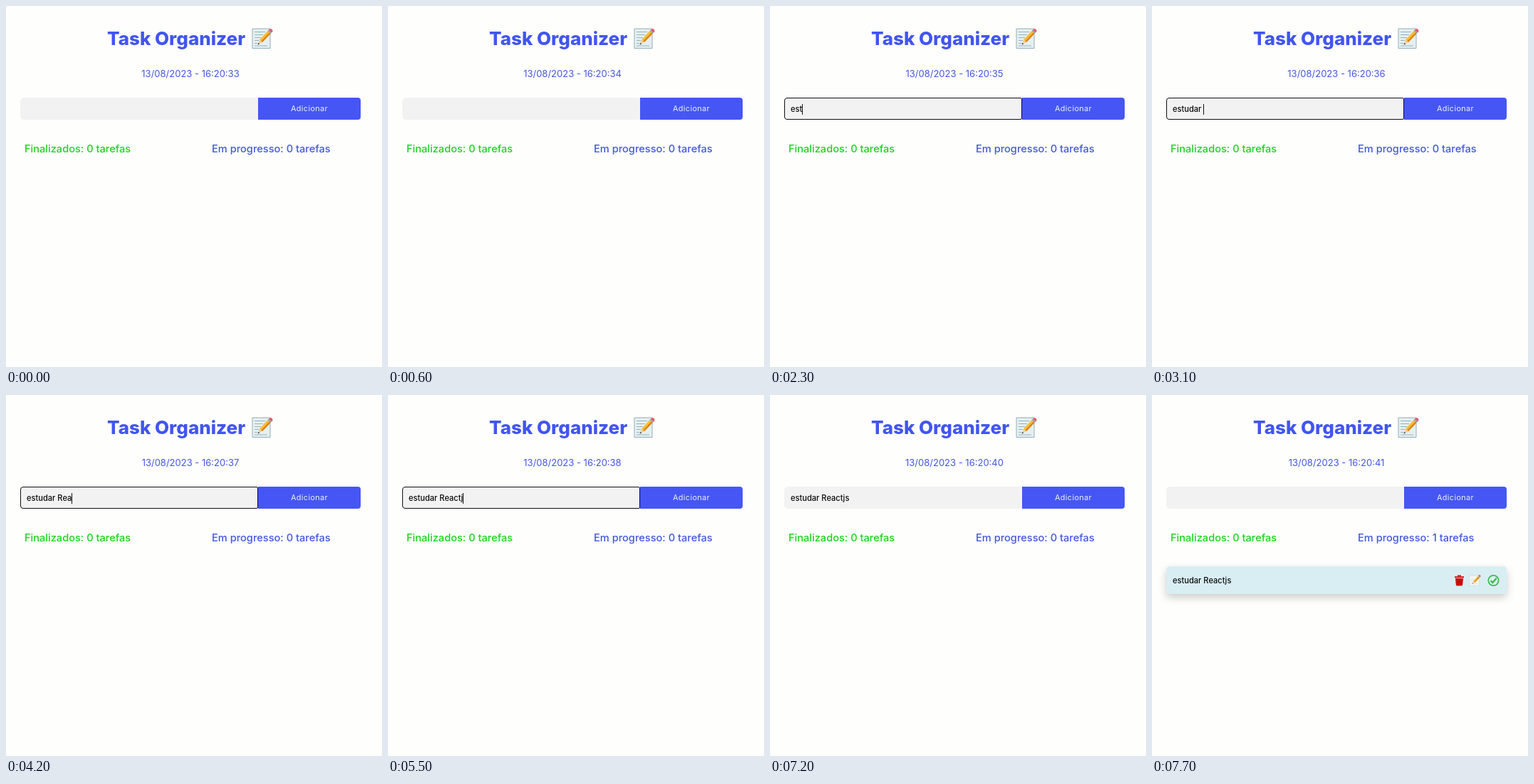
Write an HTML page that moves like this. It is 528 by 508 pixels and loops after 8000 ms.

```html
<!DOCTYPE html>
<html lang="pt-BR">
<head>
<meta charset="utf-8">
<title>Task Organizer</title>
<style>
  html, body { margin: 0; width: 100%; height: 100%; overflow: hidden; background: #fefefc; }
  #app { position: relative; width: 528px; height: 508px; overflow: hidden;
    font-family: Inter, "Open Sans", sans-serif; color: #4357e3; }
  #app > * { position: absolute; box-sizing: border-box; margin: 0; white-space: pre; }
  h1 { left: 142px; top: 30px; font-size: 26px; line-height: 32px; font-weight: 800; color: #4255f0; }
  #clock { left: 0; width: 518px; top: 86px; text-align: center; font-size: 13px; line-height: 18px; }
  #field { left: 20px; top: 129px; width: 334px; height: 31px; padding-left: 9px;
    background: #f2f2f2; border-radius: 5px 0 0 5px; z-index: 1; }
  #field.focus { outline: 1.5px solid #101014; outline-offset: -1px; border-radius: 4px 2px 2px 4px; }
  #field, #card { font-size: 11.1px; font-weight: 500; line-height: 32px; color: #0b0b0b; }
  #caret { display: inline-block; width: 1px; height: 15px; margin-right: -1px;
    background: #111; vertical-align: -4px; }
  #add { left: 354px; top: 129px; width: 144px; height: 31px; background: #4556f4;
    border-radius: 0 4px 4px 0; color: #eef0ff; text-align: center;
    font-size: 10.8px; line-height: 32px; letter-spacing: .4px; }
  .count { top: 191px; font-size: 14.6px; font-weight: 500; line-height: 20px; }
  #done { left: 26px; color: #18d41c; }
  #open { left: 289px; }
  #card { left: 20px; top: 241px; width: 478px; height: 39px; padding-left: 9px; line-height: 40px;
    background: #d9eef3; border-radius: 5px; box-shadow: 0 5px 12px rgba(0, 0, 0, .2); }
  svg { overflow: visible; }
  #memo { left: 345px; top: 31px; }
  #card svg { position: absolute; left: 0; top: 0; }
</style>
</head>
<body>
<div id="app">
  <h1>Task Organizer</h1>
  <svg id="memo" width="30" height="30">
    <defs>
      <g id="pencil">
        <path d="M8.5 23.5L11 16.5L15 20Z" fill="#f0cf9d"/>
        <path d="M8.5 23.5L9.4 20.8L11.2 22.4Z" fill="#3d3f43"/>
        <path d="M11 16.5L22.5 4L26.5 8L15 20Z" fill="#f9bd35"/>
        <path d="M13.4 18.6L24.8 6.4L26.5 8L15 20Z" fill="#d9801a"/>
        <path d="M22.5 4L24 2.5L28 6.5L26.5 8Z" fill="#8fa5ae"/>
        <path d="M24 2.5L25.2 1.3Q27 .3 28.6 1.9T29.2 5.3L28 6.5Z" fill="#e65a6e"/>
      </g>
    </defs>
    <path d="M1 1H26V28.5H1Z" fill="#e6f0f1" stroke="#93adb8"/>
    <path d="M4 5.5H19M4 9.5H16M4 13.5H13M4 17.5H10M4 21.5H8M4 25H22" stroke="#93b2c0"/>
    <use href="#pencil"/>
  </svg>
  <div id="clock"></div>
  <div id="field"><span id="typed"></span><span id="caret"></span></div>
  <div id="add">Adicionar</div>
  <div class="count" id="done">Finalizados: 0 tarefas</div>
  <div class="count" id="open"></div>
  <div id="card">estudar Reactjs<svg width="478" height="39">
    <g fill="#d20f0f">
      <path d="M405 14.2H418V16.2H405ZM409 14V12.4H414V14Z"/>
      <path d="M406 17H417L416.2 26Q416 27.6 414.5 27.6H408.5Q407 27.6 406.8 26Z"/>
    </g>
    <path d="M409.3 19V25M411.5 19V25M413.7 19V25" stroke="#a80808" stroke-width=".8"/>
    <g transform="translate(425 11.5) scale(.56)">
      <path d="M1 3H26V28H1Z" fill="#f4f6f4" stroke="#c9d4d6"/>
      <path d="M4 12H12M4 17H9M4 23H21" stroke="#c3ced2"/>
      <use href="#pencil"/>
    </g>
    <g fill="none" stroke="#3cb94a">
      <circle cx="459.5" cy="20" r="7.2" stroke-width="1.7"/>
      <path d="M455.6 20.2L458.4 23L463.8 16.8" stroke-width="2.3"/>
    </g>
  </svg></div>
</div>
<script>
const $ = id => document.getElementById(id);
const LOOP = 8000, FOCUS = 1100, BLUR = 7100, ADDED = 7300, BLINK = 500;
const TEXT = "estudar Reactjs";
// time at which each character is typed
const KEYS = [2000, 2200, 2300, 2500, 2600, 2800, 2900, 3100,
  3700, 3800, 4200, 4300, 4500, 5500, 5800];

function caretOn(t, count) {
  const since = t - (count ? KEYS[count - 1] : FOCUS);
  return Math.floor(Math.max(0, since - 60) / BLINK) % 2 === 0;
}

function draw(t) {
  const count = KEYS.filter(k => k <= t).length;
  const focus = t >= FOCUS && t < BLUR;
  const added = t >= ADDED;
  const sec = 33 + Math.floor((t + 400) / 1000);
  $("clock").textContent = `13/08/2023 - 16:20:${sec}`;
  $("typed").textContent = added ? "" : TEXT.slice(0, count);
  $("field").className = focus ? "focus" : "";
  $("caret").style.visibility = focus && caretOn(t, count) ? "visible" : "hidden";
  $("open").textContent = `Em progresso: ${added ? 1 : 0} tarefas`;
  $("card").style.visibility = added ? "visible" : "hidden";
}

const start = performance.now();
function tick() {
  draw((performance.now() - start) % LOOP);
  requestAnimationFrame(tick);
}
tick();
</script>
</body>
</html>
```
